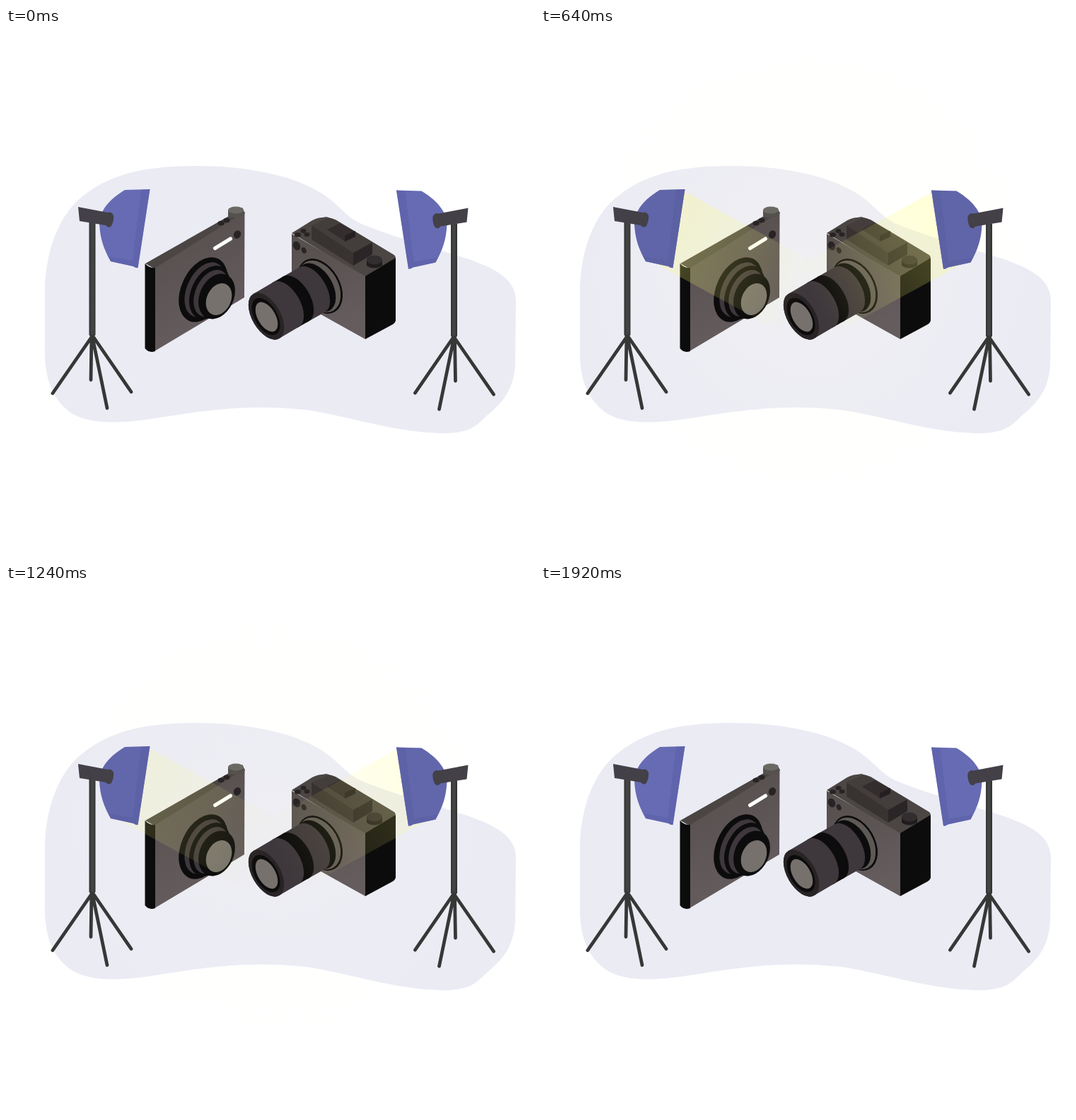
Recreate the animation shown at these times as an HTML page. Size 748 px wide and 748 px high, loop 2000 ms.

```html
<!DOCTYPE html>
<html lang="en">
<head>
<meta charset="utf-8">
<title>Studio lights</title>
<style>
  html, body { margin: 0; width: 100%; height: 100%; overflow: hidden; background: #fff; }
  svg { display: block; width: 100vw; height: 100vh; --lit: 0; }
  .lit { opacity: var(--lit); }
  .black { fill: #0d0c0d; }
  .ring { fill: #3e373c; }
  .dark { fill: #282325; }
  .top { fill: #4b4643; }
  .mount { fill: #5f5956; }
  .glass { fill: #76716c; }
</style>
</head>
<body>
<svg viewBox="0 0 748 748">
  <defs>
    <linearGradient id="beam" gradientUnits="userSpaceOnUse" x1="185" y1="285" x2="370" y2="382">
      <stop offset="0" stop-color="#ffff70" stop-opacity=".27"/>
      <stop offset=".5" stop-color="#ffff70" stop-opacity=".16"/>
      <stop offset="1" stop-color="#ffff70" stop-opacity="0"/>
    </linearGradient>
    <radialGradient id="glow" gradientUnits="userSpaceOnUse" cx="378" cy="340" r="330">
      <stop offset="0" stop-color="#fffff0" stop-opacity=".25"/>
      <stop offset="1" stop-color="#fffff0" stop-opacity="0"/>
    </radialGradient>
    <linearGradient id="body" x1="0" y1="0" x2=".3" y2="1">
      <stop offset="0" stop-color="#544e4c"/>
      <stop offset="1" stop-color="#655c5e"/>
    </linearGradient>
    <linearGradient id="pole">
      <stop offset="0" stop-color="#2f3030"/>
      <stop offset=".5" stop-color="#464747"/>
      <stop offset="1" stop-color="#343535"/>
    </linearGradient>
    <g id="lamp">
      <path class="lit" fill="url(#beam)" d="M203 231L400 339V463L160 332Z"/>
      <path id="softbox" fill="#666bb3" d="M168 229L203.500 228L186.500 339Q184 340 180 337L148 330C138 312 133 298 132 276C133 258 145 243 168 229Z"/>
      <path fill="#5c61aa" opacity=".65" d="M191 229L203.500 228L186.500 339L180 337L148 330L145 323L179 329Z"/>
      <use href="#softbox" class="lit" style="filter:brightness(.85)" fill-opacity=".4"/>
      <path fill="url(#pole)" d="M117.500 275H126.500L126.500 434L122 439L117.500 434Z"/>
      <path fill="#434047" d="M102 253L144 261Q149 259 152 265Q153 273 149 280Q145 284 141 279L104 273Z"/>
      <path fill="none" stroke="#363837" stroke-width="4.800" stroke-linecap="round"
        d="M121 437L66 516.500M121 436L120 497.500M122 436L143 537.500M123 436L177 514.500"/>
    </g>
  </defs>

  <path fill="#ebebf4" d="M55 375C55 315 75 265 107 239C150 203 205 195 270 195C340 195 405 208 445 233C475 252 480 268 505 278C560 300 610 312 655 327C690 340 720 353 721 385L720 470C720 510 702 530 680 548C662 566 653 573 615 573C545 571 490 550 425 540C335 530 270 543 210 552C160 560 120 560 95 546C62 525 54 490 55 450Z"/>
  <rect class="lit" width="748" height="748" fill="url(#glow)"/>

  <g id="compact">
    <path class="top" d="M197 333L322 262L334 254L338 262L211 341Z"/>
    <path fill="url(#body)" d="M210 340L337.500 260L337 381L210 457Z"/>
    <path class="black" d="M196.500 333Q203 340 211 339V457Q202 460 196.500 453Z"/>
    <path fill="#55514c" d="M314 258V266Q325 271 336 264V257Z"/>
    <ellipse cx="325" cy="257.500" rx="11" ry="5" fill="#6b6963"/>
    <ellipse class="dark" cx="304" cy="276" rx="4.500" ry="3.200"/>
    <ellipse class="dark" cx="312" cy="272" rx="4.500" ry="3.200"/>
    <ellipse class="dark" cx="327" cy="292" rx="5" ry="6" transform="rotate(25 327 292)"/>
    <path id="flash" d="M295.500 311.500L317.500 298" stroke="#fff" stroke-width="5" stroke-linecap="round"/>
    <g id="compactLens"></g>
  </g>

  <g id="reflex">
    <path class="top" d="M404 290L433 272Q441 268 447 268L453 267L466 271L549 321Q552 324 550 327L508 353Z"/>
    <path fill="url(#body)" d="M404 291L508 351V440L404 382Z"/>
    <path class="black" d="M508 351L551 325V414Q550 417 547 419L508 440Z"/>
    <path fill="#383331" d="M432 279L491 317V336L432 299Z"/>
    <path fill="#2a2627" d="M491 317L518 303V320L491 336Z"/>
    <path fill="#433d3b" d="M432 279L455 269Q460 268 464 271L518 303L491 318Z"/>
    <path fill="#332e2d" d="M454 285L472 276L494 288L480 295L480 302Z"/>
    <path fill="#241f21" d="M479 294L494 287V295L479 302Z"/>
    <path fill="#211d1f" d="M510 328V336Q520 343 532 336V328Z"/>
    <ellipse cx="521" cy="328" rx="11" ry="6.500" fill="#322d2e"/>
    <g class="dark">
      <ellipse cx="412.500" cy="292.500" rx="4.500" ry="3.200"/>
      <ellipse cx="420.500" cy="287" rx="4" ry="3"/>
      <ellipse cx="425.500" cy="292" rx="4" ry="3"/>
      <ellipse cx="411" cy="308" rx="5" ry="6.500" transform="rotate(-25 411 308)"/>
      <ellipse cx="421" cy="314.500" rx="3.200" ry="4.500" transform="rotate(-25 421 314)"/>
    </g>
    <g id="reflexLens"></g>
  </g>

  <use href="#lamp"/>
  <use href="#lamp" transform="translate(755.500 1.500) scale(-1 1)"/>
</svg>
<script>
  const $ = id => document.getElementById(id);
  const svg = document.querySelector('svg');

  const disc = (cls, x, y, rx, ry, tilt) =>
    `<ellipse class="${cls}" cx="${x}" cy="${y}" rx="${rx}" ry="${ry}" transform="rotate(${tilt} ${x} ${y})"/>`;

  // A tilted cylinder section between two equal discs.
  function barrel(cls, x1, y1, x2, y2, rx = 20, ry = 36.5, tilt = -30) {
    const a = tilt * Math.PI / 180, dx = -Math.sin(a) * ry, dy = Math.cos(a) * ry;
    const side = [[x1 - dx, y1 - dy], [x2 - dx, y2 - dy], [x2 + dx, y2 + dy], [x1 + dx, y1 + dy]];
    return disc(cls, x1, y1, rx, ry, tilt) +
      `<polygon class="${cls}" points="${side.join(' ')}"/>` +
      disc(cls, x2, y2, rx, ry, tilt);
  }

  $('compactLens').innerHTML = [
    ['black', 279, 370, 31, 48.5],
    ['ring', 281, 370, 25, 41],
    ['black', 288, 374, 26, 40],
    ['ring', 290, 375, 22, 35],
    ['black', 298, 379.5, 24, 33.5],
    ['glass', 301, 383.5, 17, 23.5]
  ].map(d => disc(...d, 25)).join('');

  $('reflexLens').innerHTML =
    disc('black', 444, 365, 28, 42, -30) +
    disc('mount', 443, 365.5, 26.5, 39.5, -30) +
    disc('black', 439, 367, 23, 37.5, -30) +
    barrel('ring', 433, 370, 410, 383) +
    barrel('black', 410, 383, 396, 391) +
    barrel('ring', 396, 391, 368, 407.5) +
    disc('dark', 368, 407.5, 20, 36.5, -30) +
    disc('black', 367.5, 408, 16, 29, -30) +
    disc('glass', 368.5, 408.5, 12.5, 23, -30);

  // [start ms, light level, flash colour]
  const steps = [
    [0, 0, '#fff'], [280, 1, '#fff'], [320, 1, '#fff200'], [640, 1, '#fff'],
    [1000, 0, '#fff'], [1120, 1, '#fff'], [1440, 0, '#fff'],
    [1640, 1, '#fff200'], [1920, 0, '#fff']
  ];
  const LOOP = 2000, TICK = 40, FADE_FROM = 1120, FADE_TO = 1440;

  function draw(now) {
    const t = Math.floor(now % LOOP / TICK) * TICK;
    let [, level, color] = steps.findLast(s => s[0] <= t);
    if (t >= FADE_FROM && t < FADE_TO) level = (FADE_TO - t) / (FADE_TO - FADE_FROM);
    svg.style.setProperty('--lit', level);
    $('flash').setAttribute('stroke', color);
  }

  const start = performance.now();
  function loop() {
    draw(performance.now() - start);
    requestAnimationFrame(loop);
  }
  loop();
</script>
</body>
</html>
```
